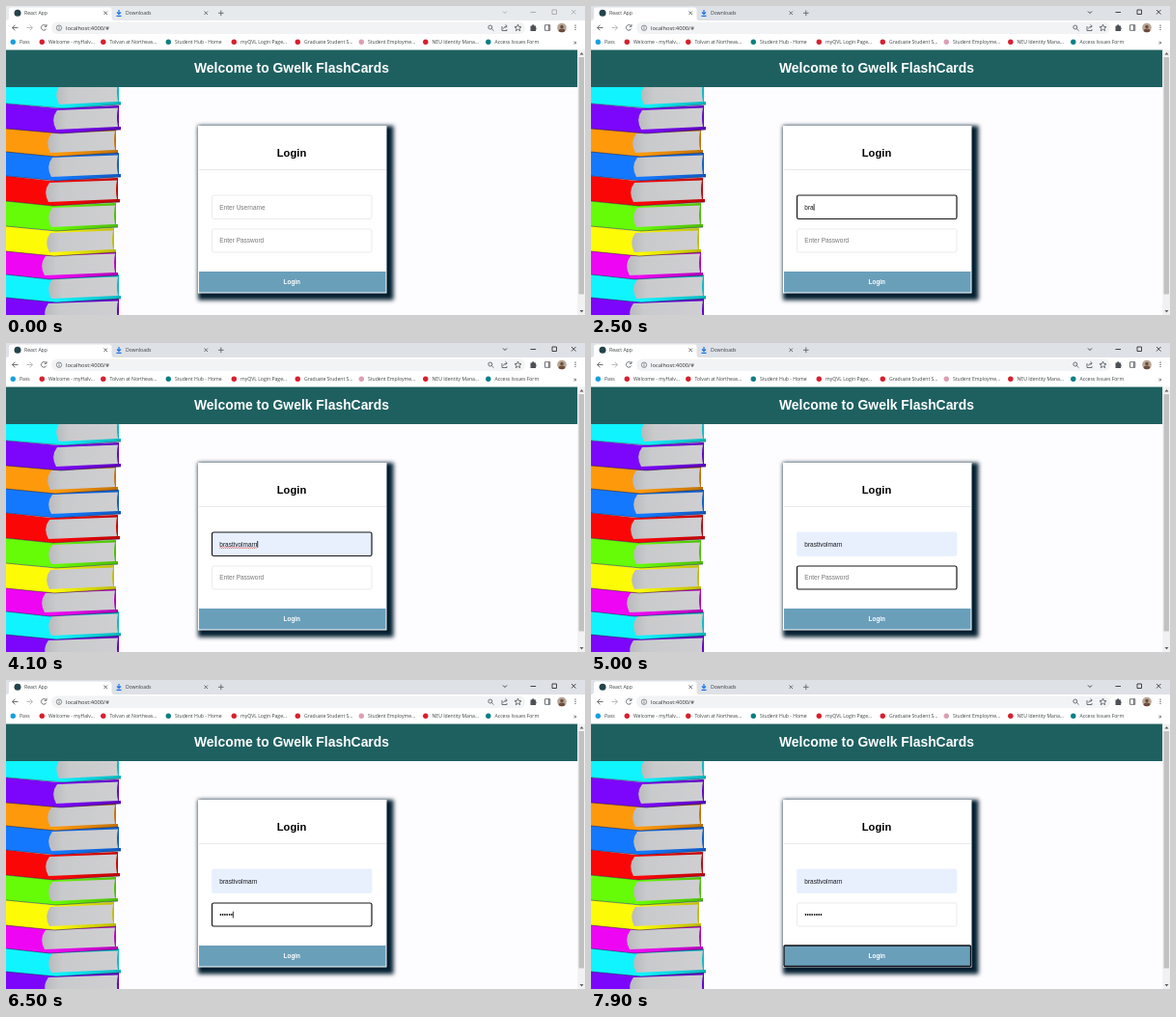
Animation, 600 px wide and 320 px high, one loop 8000 ms. Source, as an HTML page:

```html
<!DOCTYPE html>
<html lang="en">
<head>
<meta charset="utf-8">
<title>Login</title>
<style>
  html, body { margin: 0; width: 100%; height: 100%; overflow: hidden; background: #fdfcfe; }
  svg { display: block; width: 600px; height: 320px; }
  text { font-family: "Liberation Sans", Arial, sans-serif; font-size: 6.5px; white-space: pre; }
  .ui text { font-family: "Open Sans", "Noto Sans", sans-serif; font-size: 5.1px; fill: #3c4043; }
  .line { fill: none; stroke: #5f6368; stroke-width: 0.9; }
  .bold { font-weight: bold; text-anchor: middle; }
  .field { fill: #fff; stroke: #e6e5ea; stroke-width: 0.8; }
  .field.filled { fill: #e8f0fe; stroke: #e8f0fe; }
  .field.focus { stroke: #18181c; stroke-width: 1.2; }
</style>
</head>
<body>
<svg viewBox="0 0 600 320">
  <defs>
    <linearGradient id="shade">
      <stop offset=".45" stop-opacity="0"/><stop offset="1" stop-opacity=".25"/>
    </linearGradient>
    <linearGradient id="paper">
      <stop offset="0" stop-color="#b9babd"/><stop offset=".2" stop-color="#c9cacc"/><stop offset="1" stop-color="#cfcfd2"/>
    </linearGradient>
    <clipPath id="page"><path d="M0 84H592V320H0Z"/></clipPath>
  </defs>

  <g class="ui">
    <path id="strip" d="M0 0H600V15H0Z"/>
    <path fill="#fff" d="M0 15Q3 15 3 12V4Q3 1.500 5.500 1.500H107Q109.500 1.500 109.500 4V12Q109.500 15 112 15H600V45.400H0Z"/>
    <circle cx="12" cy="7.300" r="3.500" fill="#25434b"/>
    <text x="19" y="9.300">React App</text>
    <text x="124" y="9.300">Downloads</text>
    <path class="line" style="stroke:#1a73e8;stroke-width:1.200" d="M117 4V8M115 6.500L117 8.500L119 6.500M114.500 10.300H119.500"/>
    <path class="line" d="M101.500 5.500L105 9M105 5.500L101.500 9M205.500 5.500L209 9M209 5.500L205.500 9M220 7.300H225.600M222.800 4.500V10.100"/>
    <path id="controls" class="line" d="M515 5.500L517 7.500L519 5.500M543.500 6.500H549M566 4H570.500V8.500H566ZM586 4L590.500 8.500M590.500 4L586 8.500" transform="translate(8 0) translate(-8 0)"/>
    <path class="line" d="M12.500 22.500H6.500M9.300 19.700L6.500 22.500L9.300 25.300"/>
    <path class="line" style="stroke:#b4b7bb" d="M21.500 22.500H27.500M24.700 19.700L27.500 22.500L24.700 25.300"/>
    <path class="line" d="M41.500 20.700A2.800 2.800 0 1 0 41.800 23.500M42 19V21.300H39.700"/>
    <rect x="47" y="16.500" width="491" height="12.500" rx="6.200" fill="#f1f3f4"/>
    <circle class="line" cx="55" cy="22.700" r="2.700" style="stroke-width:.7"/>
    <path class="line" style="stroke-width:.8" d="M55 22.300V24.300M55 21V21.700"/>
    <text x="62" y="24.700" style="font-size:5.800px;fill:#2b2d30">localhost:4000/#</text>
    <circle class="line" cx="501.800" cy="22" r="2"/>
    <path class="line" d="M503.300 23.500L505.500 25.700M514 21V25.500H519V24M515.500 23.500Q516 21 519 21M517.500 19.300L519.300 21L517.500 22.700"/>
    <path class="line" d="M530.500 19L531.500 21.500L534 21.700L532 23.300L532.700 25.700L530.500 24.300L528.300 25.700L529 23.300L527 21.700L529.500 21.500Z"/>
    <path fill="#4d5156" d="M543.500 20.500H545A1.200 1.200 0 0 1 547.400 20.500H549V22.300A1.200 1.200 0 0 1 549 24.500V26H543.500Z"/>
    <path class="line" d="M558.500 19.700H563.800V25.300H558.500ZM562.500 19.700V25.300"/>
    <circle cx="576" cy="22.500" r="4.800" fill="#b7a695"/>
    <path fill="#6b4b3c" d="M572.600 25.900Q573 23.500 576 23.500T579.400 25.900A4.800 4.800 0 0 1 572.600 25.900ZM574.200 21.500A1.800 1.800 0 1 1 577.800 21.500A1.800 1.800 0 1 1 574.200 21.500Z"/>
    <path stroke="#5f6368" stroke-width="1.200" stroke-dasharray="1.200 1" d="M590 19.500V25.500"/>
    <g id="bookmarks"></g>
    <text x="588" y="39.500" style="font-size:7px">»</text>
  </g>

  <path fill="#1e6060" d="M0 45.400H592.300V84H0Z"/>
  <text class="bold" x="296" y="69.300" fill="#fff" style="font-size:13.900px">Welcome to Gwelk FlashCards</text>
  <path fill="#f1f1f1" d="M592.300 45.400H600V320H592.300Z"/>
  <path fill="#c1c1c1" d="M593.500 53H599V298.500H593.500Z"/>
  <path fill="#606060" d="M594.500 50.500L596.500 48L598.500 50.500ZM594.500 315L596.500 317.500L598.500 315Z"/>
  <g id="books" clip-path="url(#page)"></g>

  <rect x="199" y="124" width="202.500" height="180.500" fill="#031f30" style="filter:blur(2px)"/>
  <path fill="#fff" d="M199 124H394.500V297.500H199Z"/>
  <path stroke="#e2e1e6" stroke-width=".8" d="M200 169.500H394"/>
  <text class="bold" x="296" y="156" style="font-size:11.200px">Login</text>
  <rect id="userBox" x="213.500" y="196" width="165.500" height="24.500" rx="1.800"/>
  <rect id="passBox" x="213.500" y="231" width="165.500" height="24" rx="1.800"/>
  <text id="user" x="221.300" y="210.600"></text>
  <text id="pass" x="221.300" y="245.300"></text>
  <path id="squiggle" fill="none" stroke="#e0332e" stroke-width=".7"/>
  <path id="caret" stroke="#000" stroke-width=".8"/>
  <path fill="#6a9fba" d="M200 275H393.500V296.500H200Z"/>
  <rect id="ring" x="200" y="275" width="193.500" height="21.500" rx="1" fill="none" stroke="#101014" stroke-width="1.300"/>
  <text class="bold" x="296.300" y="288" fill="#fff" style="font-size:6.400px">Login</text>
</svg>
<script>
const $ = id => document.getElementById(id);

// Bookmark bar: label, text x, icon colour
const red = '#d6202f';
$('bookmarks').innerHTML = [
  ['Pass', 14, '#1a9fe0'], ['Welcome - myHalv...', 44, red], ['Tolvan at Northeas...', 107.5, red],
  ['Student Hub - Home', 175, '#0b7f83'], ['myQVL Login Page...', 243, red],
  ['Graduate Student S...', 309, red], ['Student Employme...', 375, '#dc9fb4'],
  ['NEU Identity Mana...', 441.5, red], ['Access Issues Form', 506.5, '#0a7f86']
].map(([label, x, color]) =>
  `<circle cx="${x - 6.7}" cy="37.3" r="2.7" fill="${color}"/><text x="${x}" y="39.2">${label}</text>`).join('');

// Book stack, top to bottom: colour, top, right edge, where the pages begin
const book = ([color, y, right, pages]) => {
  const foot = y + 27;
  const cover = `M0 ${y - 3}L${pages + 5} ${y + 2}L${right} ${y - 1}V${foot - 6}` +
    `H${right + 2}V${foot - 3}L${pages + 8} ${foot + 1}L0 ${foot - 4}Z`;
  return `<path d="${cover}" fill="${color}"/><path d="${cover}" fill="url(#shade)"/>
    <path d="M${right - 1} ${y + 1.5}L${pages + 4} ${y + 4}Q${pages - 3} ${y + 13} ${pages + 3} ${foot - 3}
      L${right - 1} ${foot - 6}Q${right - 3} ${y + 11} ${right - 1} ${y + 1.5}Z" fill="url(#paper)"/>
    <path d="M0 ${foot - 4}L${pages + 8} ${foot + 1}L${right + 2} ${foot - 3}" fill="none" stroke="#141438" stroke-opacity=".6" stroke-width=".8"/>`;
};
$('books').innerHTML = [
  ['#10f4ff', 78, 117, 52], ['#7c06fb', 104, 117, 49], ['#ff990c', 128, 114, 43], ['#1478ff', 153, 117, 44],
  ['#fb0606', 179, 116, 41], ['#66fb06', 205, 114, 44], ['#fdfb06', 231, 112, 42], ['#ee06f4', 255, 114, 37],
  ['#10f4ff', 279, 117, 44], ['#7c06fb', 304, 117, 40]
].reverse().map(book).join('');

const name = 'brastivolmarn';
const userKeys = [2100, 2200, 2500, 2600, 2800, 3000];
const passKeys = [5300, 5700, 5900, 6000, 6300, 6500, 6600, 6700];
const typed = (keys, t) => keys.filter(k => t >= k).length;

function setField(id, value, hint, focus, filled) {
  $(id).textContent = value || hint;
  $(id).setAttribute('fill', value ? '#16181c' : '#777');
  $(id + 'Box').setAttribute('class', 'field' + (filled ? ' filled' : '') + (focus ? ' focus' : ''));
}

function draw(t) {
  const active = t >= 500;
  $('strip').style.fill = active ? '#dee1e6' : '#e7eaed';
  $('controls').style.stroke = active ? '#333' : '#a6a8ab';

  const filled = t >= 3600, inUser = t >= 1500 && t < 4400, inPass = t >= 4400 && t < 7900;
  const user = filled ? name : name.slice(0, typed(userKeys, t));
  const pass = '•'.repeat(typed(passKeys, t));
  setField('user', user, 'Enter Username', inUser, filled);
  setField('pass', pass, 'Enter Password', inPass, false);

  const caretOn = (t >= 1500 && t < 3600) || (t >= 4000 && t < 5000) || (t >= 5300 && t < 7000);
  const x = 221.7 + ((inUser ? user : pass) ? $(inUser ? 'user' : 'pass').getComputedTextLength() : 0);
  $('caret').setAttribute('d', caretOn ? `M${x} ${inUser ? 205 : 239.7}v6.8` : '');

  const wavy = t >= 4000 && t < 4400;
  $('squiggle').setAttribute('d', wavy ? 'M221.5 212.5' + 'l1 -.8l1 .8'.repeat(19) : '');
  $('ring').style.display = t >= 7900 ? '' : 'none';
}

function tick() {
  draw(performance.now() % 8000);
  requestAnimationFrame(tick);
}
tick();
</script>
</body>
</html>
```
